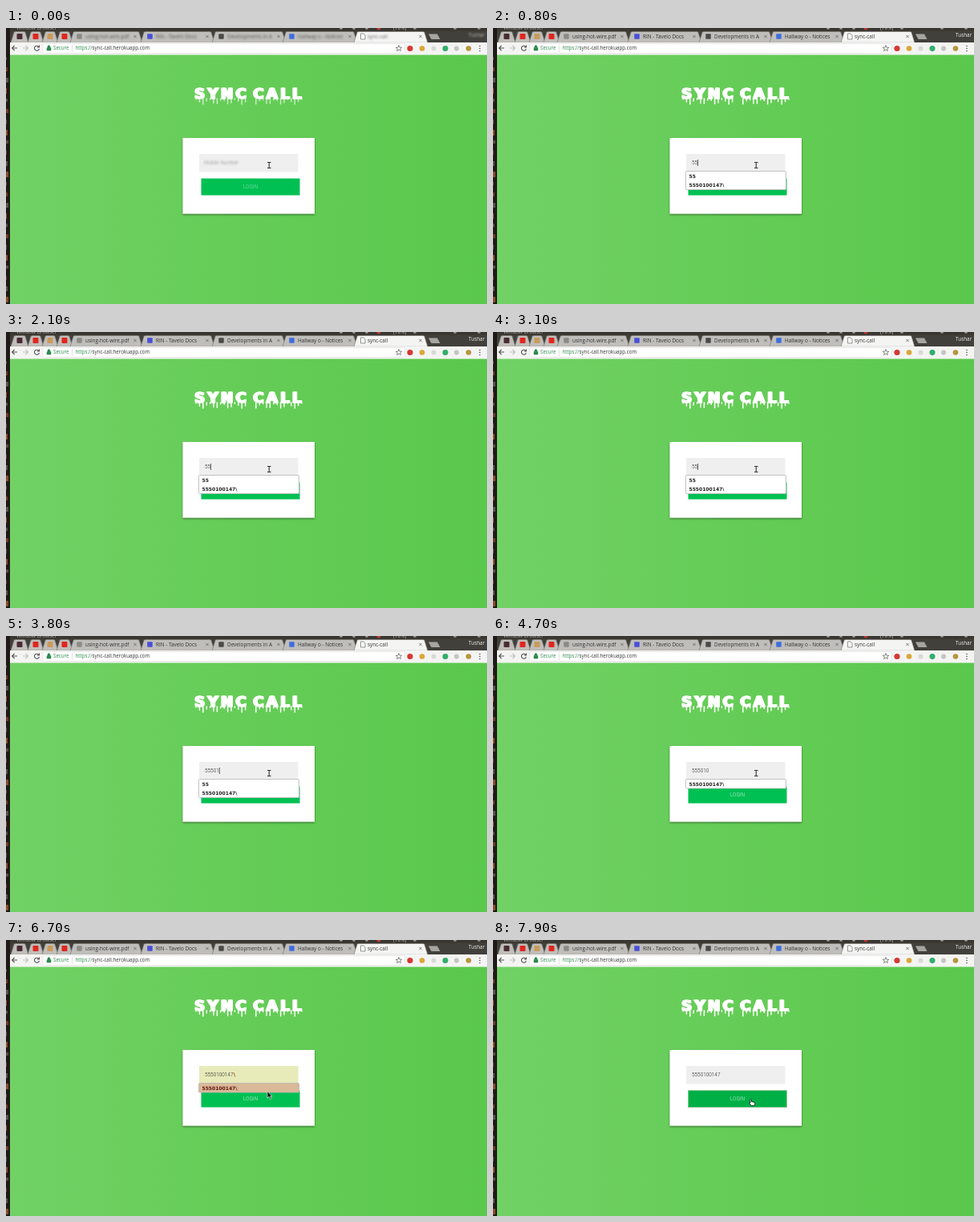
These frames come from a looping animation (600x344 px, 8 s). An HTML page:

```html
<!DOCTYPE html>
<html lang="en">
<head>
<meta charset="utf-8">
<title>sync-call</title>
<style>
  html, body { margin: 0; width: 100%; height: 100%; overflow: hidden; background: #35332f; }
  svg { display: block; width: 100vw; height: 100vh; }
  text { white-space: pre; }
  .ui { font-family: "Open Sans", "Noto Sans", sans-serif; font-size: 6.4px; }
  .form { font-family: Roboto, sans-serif; font-size: 6.4px; font-weight: 300; }
  .option { font: bold 6px "DejaVu Sans", sans-serif; }
  .title { font: bold 18px "DejaVu Sans", sans-serif; letter-spacing: 3.4px; word-spacing: -4.6px; }
</style>
</head>
<body>
<svg id="stage" viewBox="0 0 600 344">
  <defs>
    <linearGradient id="green">
      <stop offset="0" stop-color="#71d165"/>
      <stop offset=".45" stop-color="#66cd58"/>
      <stop offset="1" stop-color="#5ac84c"/>
    </linearGradient>
    <filter id="shadow" x="-10%" y="-10%" width="120%" height="125%">
      <feDropShadow dx="0" dy="1.2" stdDeviation="1.3" flood-opacity=".5"/>
    </filter>
    <filter id="soft"><feGaussianBlur stdDeviation=".8"/></filter>
  </defs>

  <rect width="600" height="344" fill="#42403b"/>
  <rect width="600" height="3.5" fill="#383631"/>
  <g id="panel"></g>
  <g id="tabs"></g>

  <!-- toolbar -->
  <rect x="5" y="18" width="595" height="16" fill="#f4f4f3"/>
  <rect x="46" y="19.5" width="451" height="12" rx="1.5" fill="#fff" stroke="#dededc" stroke-width=".6"/>
  <g fill="none" stroke="#555" stroke-width="1.1">
    <path d="M14 25H7.5M10.5 22L7.5 25L10.5 28"/>
    <path d="M21 25H27.5M24.5 22L27.5 25L24.5 28" stroke="#c0c0c0"/>
    <path d="M41 23.5A3 3 0 1 0 41.4 26M41.5 21.5V24H39"/>
    <path d="M490 21.5L491 24.2L493.8 24.3L491.6 26L492.4 28.7L490 27.1L487.6 28.7L488.4 26L486.2 24.3L489 24.2Z" stroke-width=".7"/>
  </g>
  <path d="M51 24.5h5v3.6h-5zM52 24.5v-1.4a1.5 1.5 0 0 1 3 0V24.5" fill="#2b8a4a" stroke="#2b8a4a" stroke-width=".5"/>
  <g class="ui" style="font-size:6.2px">
    <text x="59" y="27" fill="#2b8a4a">Secure</text>
    <path d="M82.5 21V30" stroke="#ccc" stroke-width=".6"/>
    <text x="86.5" y="27" fill="#333"><tspan fill="#2b8a4a">https://</tspan>sync-call.herokuapp.com</text>
  </g>
  <g id="extensions"></g>

  <!-- desktop launcher edge -->
  <rect width="5" height="344" fill="#1f1a17"/>
  <g id="launcher"></g>

  <!-- page -->
  <rect x="5" y="33.5" width="595" height="310.5" fill="url(#green)"/>
  <text id="title" class="title" x="234.5" y="88.3" fill="#fff" stroke="#fff" stroke-width="1">SYNC CALL</text>
  <use href="#title" x=".8"/>
  <use href="#title" x="1.6"/>
  <path id="drips" fill="none" stroke="#fff" stroke-linecap="round"/>

  <rect x="220.5" y="137" width="164.5" height="94.5" fill="#fff" filter="url(#shadow)"/>
  <rect id="field" x="241" y="157" width="123.5" height="22.5"/>
  <text id="placeholder" class="form" x="247" y="170" fill="#888" filter="url(#soft)">Mobile Number</text>
  <text id="typed" class="form" x="248" y="170.2" fill="#222"></text>
  <rect id="caret" y="164" width=".7" height="8" fill="#222"/>
  <rect id="button" x="243.5" y="187.5" width="123" height="21"/>
  <text id="login" class="form" x="305" y="200.4" text-anchor="middle" fill="#d5f3df">LOGIN</text>

  <g id="dropdown">
    <rect id="list" x="240.5" y="178.5" width="125" rx="1" stroke="#b4b4b4" stroke-width=".8"/>
    <text id="shortOption" class="option" x="244.5" y="186.7" fill="#222"></text>
    <text id="longOption" class="option" x="244.5"></text>
  </g>

  <path id="beam" d="M326 167.5H330.5M326 174.5H330.5M328.2 167.5V174.5" stroke="#333" stroke-width="1.1"/>
  <path id="arrow" d="M0 0V8.5L2 6.7L3.5 9.8L5 9.1L3.5 6.2H6Z" fill="#111" stroke="#fff" stroke-width=".6"/>
  <path id="hand" d="M0 .5Q.8-.6 1.5 .5V3L5 3.8Q6 4 5.8 5.5L5 8H1.2L-1.5 4.6Q-1.2 3.5 0 4.6Z" fill="#fff" stroke="#111" stroke-width=".8"/>
</svg>

<script>
const $ = id => document.getElementById(id);
const set = (id, attrs) => Object.entries(attrs).forEach(([k, v]) => $(id).setAttribute(k, v));
const show = (id, on) => $(id).style.display = on ? '' : 'none';
const square = (x, y, size, color) =>
  `<rect x="${x - size / 2}" y="${y - size / 2}" width="${size}" height="${size}" rx="1" fill="${color}"/>`;
const dot = (x, y, r, color) => `<circle cx="${x}" cy="${y}" r="${r}" fill="${color}"/>`;
const cross = (x, y) =>
  `<path d="M${x - 1.7} ${y - 1.7}l3.4 3.4m0-3.4l-3.4 3.4" stroke="#666" stroke-width=".8"/>`;

const NUMBER = '5550100147';
const DIGIT = 3.58;
const LOOP = 8000;

// Left edge, right edge, icon colour, label
const TABS = [
  [6, 28, '#4b2b36', ''], [27, 47, '#e3251f', ''], [45, 65, '#c99a5b', ''], [63, 83, '#e3251f', ''],
  [80, 170, '#8b8b88', 'using-hot-wire.pdf'], [168, 260, '#4650d8', 'RIN - Tavelo Docs'],
  [257, 349, '#4a4a48', 'Developments in A'], [345, 438, '#3f6ee0', 'Hallway o - Notices'],
  [434, 526, '#fff', 'sync-call']
];

function tab([left, right, color, label], i) {
  const active = i === TABS.length - 1;
  const path = `M${left} 18.3L${left + 4} 5.5Q${left + 4.5} 4.5 ${left + 6} 4.5H${right - 6}Q${right - 4.5} 4.5 ${right - 4} 5.5L${right} 18.3Z`;
  const shape = `<path d="${path}" fill="${active ? '#f4f4f3' : '#c0beba'}" stroke="#73716c" stroke-width=".6"/>`;
  const icon = label
    ? active
      ? '<path d="M442.5 7h3.5l2 2v5h-5.5z" fill="#fff" stroke="#666" stroke-width=".7"/>'
      : square(left + 11.5, 10.5, 6.5, color)
    : square((left + right) / 2, 10.5, 7, color);
  return shape + icon + (label
    ? `<text class="ui label" x="${left + (active ? 17 : 19)}" y="12.6" fill="#333">${label}</text>` + cross(right - 9, 10.5)
    : '');
}

$('tabs').innerHTML = TABS.map(tab).join('') +
  '<path d="M527 7.5h11l3.5 6.5h-11z" fill="#a7a5a0"/>' +
  '<text class="ui label" x="577" y="11" fill="#eee">Tushar</text>';

$('panel').innerHTML =
  '<text class="ui" x="13" y="1.8" fill="#aaa">Window Browser</text>' +
  '<text class="ui" x="483" y="1.6" fill="#bbb">(70%)</text>' +
  [418, 434, 450, 510, 560, 590].map(x => dot(x, 0, 2, '#96938d')).join('') + dot(465, 0, 2.5, '#bb3a34');

$('extensions').innerHTML =
  dot(504, 25.5, 3.6, '#d33a32') + dot(519, 25.5, 3.3, '#dca53a') + dot(533.5, 25.5, 3, '#d9d9d8') +
  dot(548, 25.5, 3.5, '#2fae6a') + dot(562, 25.5, 3, '#c4c4c4') + dot(577, 25.5, 3.3, '#b8953f') +
  [22.5, 25.5, 28.5].map(y => dot(591, y, .8, '#555')).join('');

$('launcher').innerHTML = Array.from({ length: 24 }, (_, i) =>
  `<rect y="${36 + i * 13}" width="${1 + i % 3}" height="${4 + i % 4}" fill="${['#574b3d', '#6b3c2a', '#55534e', '#8a4c2c'][i % 4]}"/>`
).join('');

// Drips of uneven length hang below the letters
set('drips', {
  d: Array.from({ length: 31 }, (_, i) => {
    const x = 237 + i * 4.4;
    const gap = x > 301 && x < 308;
    return gap ? '' : `M${x} 88v${1 + 6 * Math.sin(i * 2.3) ** 2}`;
  }).join(''),
  'stroke-width': 1.5
});

// Time, digits entered, start of the caret's blink cycle
const STROKES = [
  [0, 0, 0], [400, 1, 400], [600, 2, 1100], [3600, 4, 3600], [3800, 5, 3800], [4000, 6, 4000],
  [4800, 7, 4800], [5100, 8, 5100], [5600, 9, 5600], [5900, 10, 5900], [6900, 10, 6300]
];

function draw(t) {
  const [, count, blink] = STROKES.filter(s => s[0] <= t).pop();
  const preview = t >= 6500 && t < 6900;
  const focused = t >= 7500;
  const settling = t < 300;
  const bothOptions = t < 4000;

  document.querySelectorAll('.label').forEach(el => {
    el.setAttribute('opacity', settling ? .7 : 1);
    settling ? el.setAttribute('filter', 'url(#soft)') : el.removeAttribute('filter');
  });
  set('drips', { opacity: settling ? .65 : 1 });
  set('login', { opacity: settling ? .7 : 1 });

  set('field', { fill: preview ? '#e7eab9' : '#efefef' });
  show('placeholder', count === 0);
  $('typed').innerHTML = NUMBER.slice(0, count) + (preview ? '<tspan fill="#b5651d" font-weight="700">\\</tspan>' : '');
  set('caret', { x: 248 + count * DIGIT });
  show('caret', count > 0 && !preview && !focused && (t - blink) % 1000 < 500);

  show('dropdown', count > 0 && t < 6900);
  set('list', { height: bothOptions ? 23 : 11.5, fill: preview ? '#d9b997' : '#fff' });
  $('shortOption').textContent = NUMBER.slice(0, 2);
  show('shortOption', bothOptions);
  $('longOption').textContent = NUMBER + '\\';
  set('longOption', { y: bothOptions ? 197.7 : 186.7, fill: preview ? '#651414' : '#222' });

  set('button', {
    fill: t >= 6900 ? '#00b047' : '#00c053',
    stroke: focused ? '#8fc79a' : 'none',
    'stroke-width': 1
  });

  const glide = Math.min(1, Math.max(0, (t - 6400) / 300));
  const rest = Math.min(1, Math.max(0, (t - 6900) / 800));
  show('beam', t < 6400);
  show('arrow', t >= 6400 && t < 6900);
  show('hand', t >= 6900);
  set('arrow', { transform: `translate(${328 - 2 * glide} ${177 + 11.5 * glide})` });
  set('hand', { transform: `translate(${326 - 5 * rest} ${194 + 4.5 * rest})` });
}

function tick() {
  draw(performance.now() % LOOP);
  requestAnimationFrame(tick);
}
tick();
</script>
</body>
</html>
```
